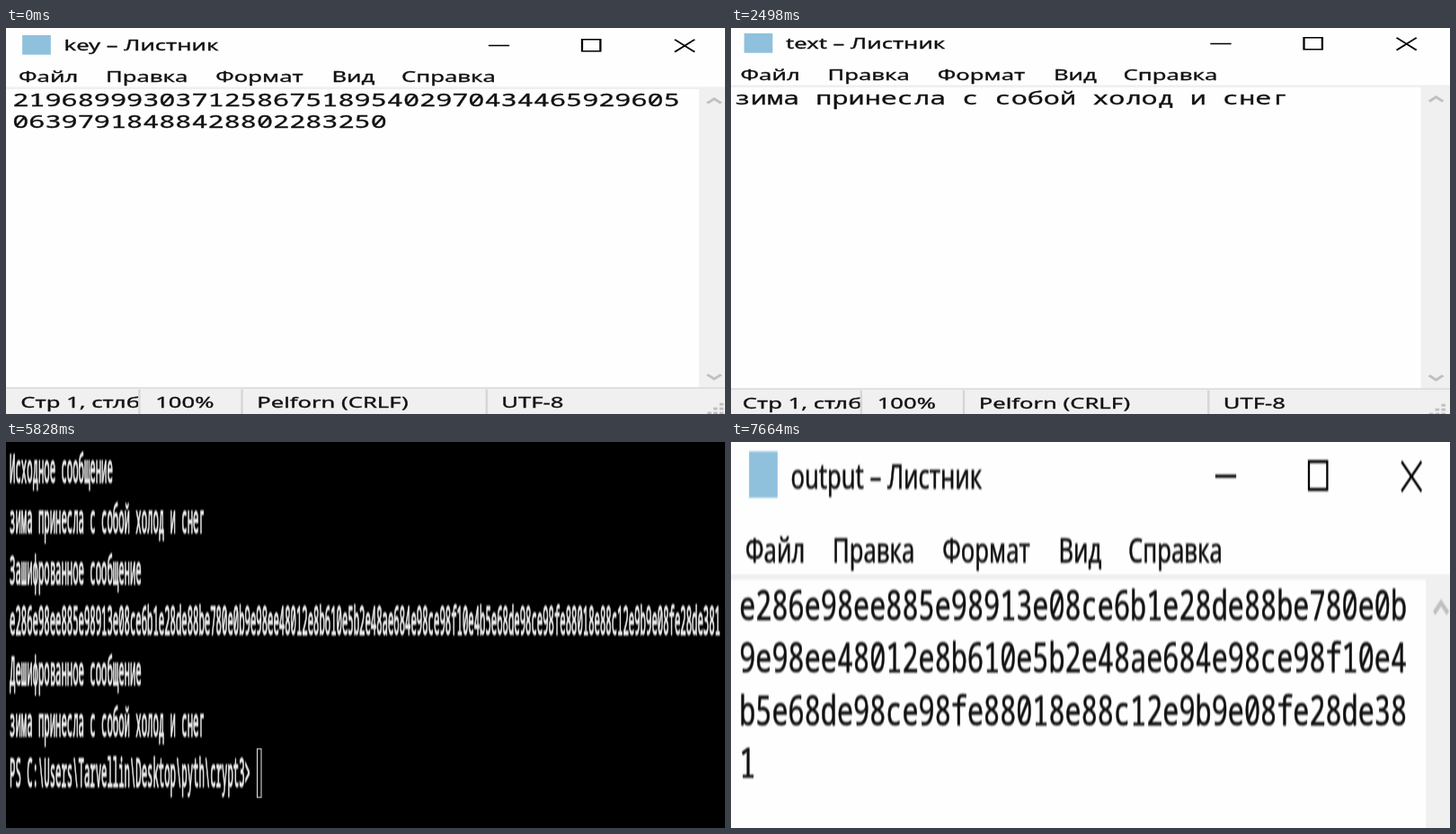
Recreate the animation shown at these times as an HTML page. Size 800 by 429 pixels, loop 8000 ms.

```html
<!DOCTYPE html>
<html lang="ru">
<head>
<meta charset="utf-8">
<style>
  html, body { margin: 0; width: 100%; height: 100%; overflow: hidden; background: #fff; }
  svg { display: block; width: 100vw; height: 100vh; }
  text { white-space: pre; stroke-width: .2; }
  .ui { font: 11.3px "Noto Sans", sans-serif; }
  .mono { font: 13.333px "Noto Sans Mono", monospace; }
  .terminal text { stroke-width: .6; }
  .soft { filter: blur(.25px); }
  .line { fill: none; stroke: #000; }
  .chevron { fill: none; stroke: #c0c0c0; stroke-width: 1.7; }
</style>
</head>
<body>
<svg id="stage" viewBox="0 0 800 429" preserveAspectRatio="none"></svg>
<script>
const cipher = "e286e98ee885e98913e08ce6b1e28de88be780e0b" +
  "9e98ee48012e8b610e5b2e48ae684e98ce98f10e4" +
  "b5e68de98ce98fe88018e88c12e9b9e08fe28de381";
const message = "зима принесла с собой холод и снег";
const key = "21968999303712586751895402970434465929605" + "06397918488428802283250";
const COLUMNS = 41;

const label = (x, y, str, cls = "ui", color = "#111") =>
  `<text x="${x}" y="${y}" class="${cls}" fill="${color}" stroke="${color}">${str.replace(">", "&gt;")}</text>`;
const box = (x, y, w, h, fill) =>
  `<rect x="${x}" y="${y}" width="${w}" height="${h}" fill="${fill}"/>`;
const path = (d, cls) => `<path d="${d}" class="${cls}"/>`;
const group = (transform, content, cls = "") =>
  `<g transform="${transform}" class="${cls}">${content}</g>`;

function titleBar(name) {
  return box(8, 5.5, 14, 15, "#8fc1dc") +
    label(28.5, 17.6, name + " – Листник") +
    path("M237 13.5h10.3M283 8.8h9v9h-9zM328.5 8.8l9.8 9.6m0-9.6l-9.8 9.6", "line");
}

function menuBar() {
  const items = { Файл: 6.2, Правка: 49, Формат: 103, Вид: 160, Справка: 194.3 };
  return Object.entries(items).map(([item, x]) => label(x, 41.3, item)).join("");
}

function statusBar() {
  let grip = "";
  for (let row = 0; row < 3; row++)
    for (let col = 0; col <= row; col++)
      grip += box(350.5 - 3 * col, 288 + 3.4 * row, 2, 2, "#bfbfbf");
  return box(-5, 276, 380, 40, "#f0f0f0") + box(-5, 276, 380, 1, "#d9d9d9") +
    label(7.2, 291.6, "Стр 1, стлб") + box(65, 277, 50, 30, "#f0f0f0") +
    [65, 115.4, 235.6].map(x => box(x, 277.5, 1, 20, "#d5d5d5")).join("") +
    label(73.4, 291.6, "100%") + label(123.3, 291.6, "Pelforn (CRLF)") +
    label(243.4, 291.6, "UTF-8") + grip;
}

function editor(name, content, { x = 0, y = 0, scaleY = 1.447, footer = 0 } = {}) {
  const lines = content.match(new RegExp(`.{1,${COLUMNS}}`, "g"));
  return box(0, 0, 800, 429, "#fefefe") + group(`translate(${x} ${y}) scale(2.265 ${scaleY})`,
    titleBar(name) + menuBar() +
    box(-5, 45.2, 380, 1.8, "#efefef") + box(340.4, 46, 30, 240, "#f0f0f0") +
    lines.map((line, i) => label(3.2, 60 + 17 * i, line, "mono")).join("") +
    path("M344.5 57.8l3.4-3.4 3.4 3.4", "chevron") +
    group(`translate(0 ${footer})`,
      path("M344.5 266.2l3.4 3.4 3.4-3.4", "chevron") + statusBar()), "soft");
}

function terminal() {
  const prompt = "PS C:\\Users\\Tarvellin\\Desktop\\pyth\\crypt3>";
  const lines = ["Исходное сообщение", message, "Зашифрованное сообщение", cipher,
    "Дешифрованное сообщение", message, prompt];
  return box(0, 0, 800, 429, "#000") + group("translate(4 44.8) scale(.7975 3.3)",
    lines.map((line, i) => label(0, 17.1 * i, line, "mono", "#ececec")).join(""), "terminal soft") +
    `<rect x="279.5" y="341" width="4.5" height="54" fill="none" stroke="#e8e8e8"/>`;
}

const scenes = [
  { start: 0, markup: editor("key", key) },
  { start: 500, markup: editor("text", message, { x: -3.5, y: -2, footer: 2.1 }) },
  { start: 3830, markup: terminal() },
  { start: 7160, markup: editor("output", cipher, { x: 2, y: -8.5, scaleY: 3.44 }) },
];
const LOOP = 8000;
const stage = document.getElementById("stage");
stage.innerHTML = scenes.map(scene => `<g>${scene.markup}</g>`).join("");
const layers = [...stage.children];

function render(now) {
  const time = now % LOOP;
  const current = scenes.findLastIndex(scene => scene.start <= time);
  layers.forEach((layer, i) => layer.style.display = i === current ? "" : "none");
  requestAnimationFrame(render);
}
render(0);
</script>
</body>
</html>
```
